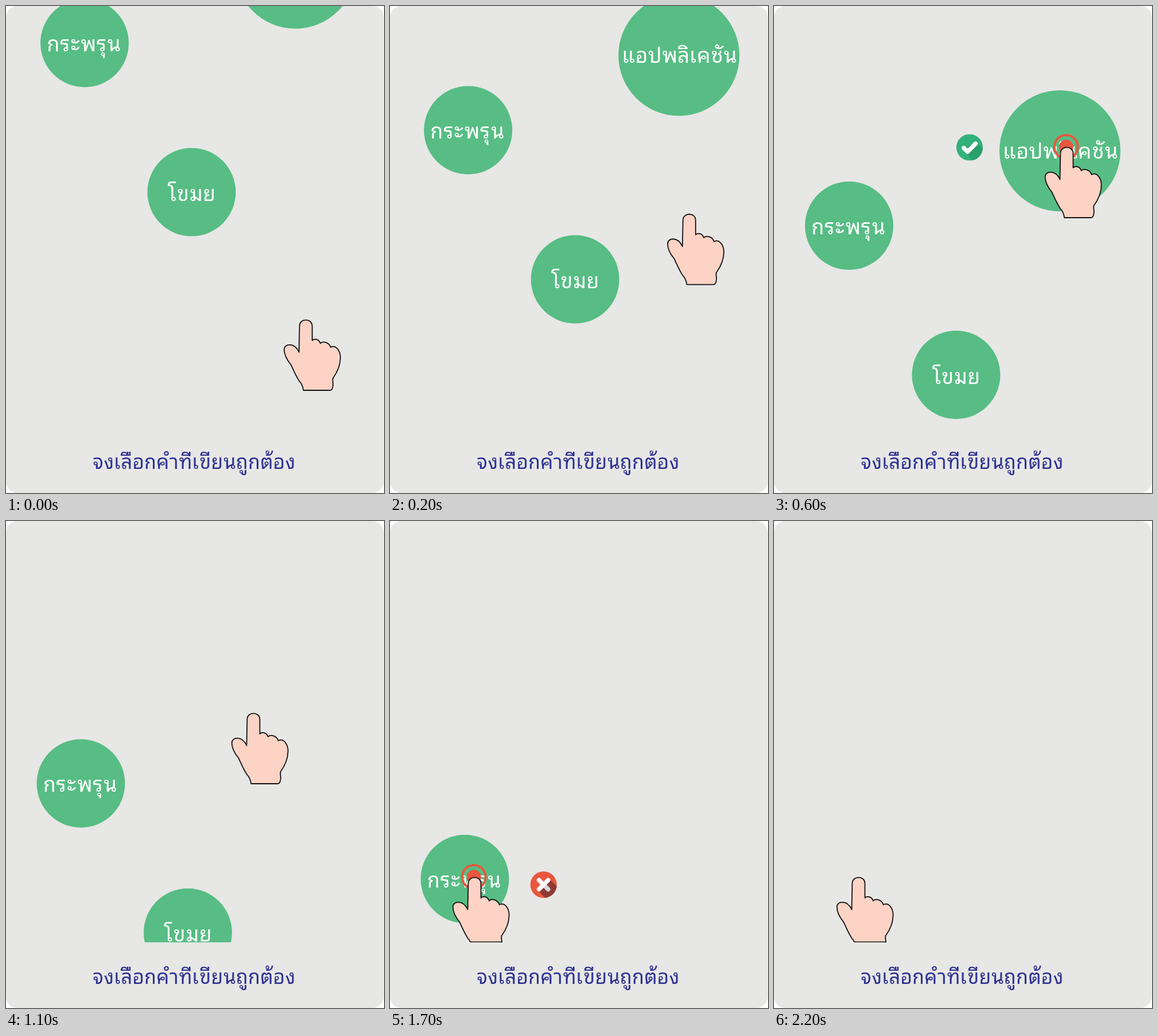
Recreate the animation shown at these times as an HTML page. Size 659x849 px, loop 2.7 s.

```html
<!DOCTYPE html>
<html lang="th">
<head>
<meta charset="utf-8">
<style>
html, body { margin: 0; height: 100%; overflow: hidden; background: #fff; }
svg { display: block; width: 659px; height: 849px; }
text { font: 300 37px "Noto Sans Thai Looped", "Noto Looped Thai", "Noto Sans Thai", Loma, "Noto Sans", sans-serif; text-anchor: middle; fill: #fff; }
.task { font-size: 35px; fill: #2e3192; }
.red { fill: #e9573f; }
.cross { fill: none; stroke: #fff; stroke-width: 7.5; stroke-linecap: round; stroke-linejoin: round; }
</style>
</head>
<body>
<svg viewBox="0 0 659 849">
  <defs>
    <clipPath id="field"><path d="M0 0H659V734.5H0z"/></clipPath>
    <clipPath id="disc"><circle r="23.2"/></clipPath>
  </defs>
  <rect width="658.5" height="849" rx="20" fill="#e7e7e5"/>
  <text class="task" x="327.5" y="807">จงเลือกคำที่เขียนถูกต้อง</text>
  <g clip-path="url(#field)">
    <g id="words" fill="#57bd84">
      <circle cx="137" cy="64.5" r="77"/>
      <text x="135.5" y="79">กระพรุน</text>
      <circle cx="323.5" cy="324.5" r="77"/>
      <text x="323.5" y="340">โขมย</text>
      <g id="answer">
        <circle cx="504.5" cy="-66" r="105.5"/>
        <text x="505.5" y="-53">แอปพลิเคชัน</text>
      </g>
    </g>
    <g id="right" transform="translate(341 246.5)" clip-path="url(#disc)">
      <circle r="23.2" fill="#32b17b"/>
      <path d="M-12 3L12 -9L36 15V40H20z" fill="#2a9f6c"/>
      <path class="cross" d="M-10 1L-3.5 7.5L10.5 -6.5"/>
    </g>
    <g id="wrong" transform="translate(267.7 634)" clip-path="url(#disc)">
      <circle class="red" r="23.2"/>
      <path d="M-10 10L10 -10L34 14V40H20z" fill="#8f3a32"/>
      <path class="cross" d="M0 0L8 8" style="stroke:#d3d6dd"/>
      <path class="cross" d="M-8 8L8 -8M-8 -8L0 0"/>
    </g>
    <g id="hand">
      <g id="tap">
        <circle class="red" cx="521.5" cy="546.5" r="12.5"/>
        <circle cx="521.5" cy="546.5" r="20.5" fill="none" stroke="#e9573f" stroke-width="4"/>
      </g>
      <path fill="#fcd3c5" stroke="#111" stroke-width="1.8" stroke-linejoin="round" d="M510.8 603.5L511.7 558C511.7 543.7 533.8 543.7 533.8 558V583C538 579 546 581 548 588C553 584 563 586 566 595C575 590 583 601 583 613C583 630 575 642 570 649C568.5 655 571 656 570 662C569.5 667 568 670 565 670H518.5C518 664 514 656 512 655C505 645 500 632 496.5 625C490 617 485 607 485 599C485 588 503 586 510.8 603.5z"/>
    </g>
    <path id="cuff" d="M140 733.8H196" stroke="#111" stroke-width="1.8"/>
  </g>
</svg>
<script>
// end time, words x, words y, hand x, hand y
const poses = [
  [200, 0, 0, 0, 0],
  [400, -.8, 152, -1, -184.3],
  [600, -5.5, 249, -6, -245],
  [1100, -6, 318.5, -12.3, -301],
  [1300, -6.5, 393, -91.3, -212],
  [1500, -6.5, 450, -166, -117],
  [1700, -6.5, 506.5, -296, -12],
  [2700, -6.5, 559.5, -375.3, 74]
];
const el = id => document.getElementById(id);
const show = (id, on) => el(id).setAttribute("visibility", on ? "visible" : "hidden");
const move = (id, x, y) => el(id).setAttribute("transform", `translate(${x} ${y})`);

function draw(now) {
  const t = now % 2700;
  const [, wx, wy, hx, hy] = poses.find(p => t < p[0]);
  const hit = t >= 600 && t < 1100, miss = t >= 1700 && t < 2200;
  move("words", wx, wy);
  move("hand", hx, hy);
  el("words").style.display = t < 2200 ? "" : "none";
  show("answer", t < 1100);
  show("right", hit);
  show("wrong", miss);
  show("tap", hit || miss);
  show("cuff", t >= 1700);
}
const start = performance.now();
function loop() {
  draw(performance.now() - start);
  requestAnimationFrame(loop);
}
loop();
</script>
</body>
</html>
```
